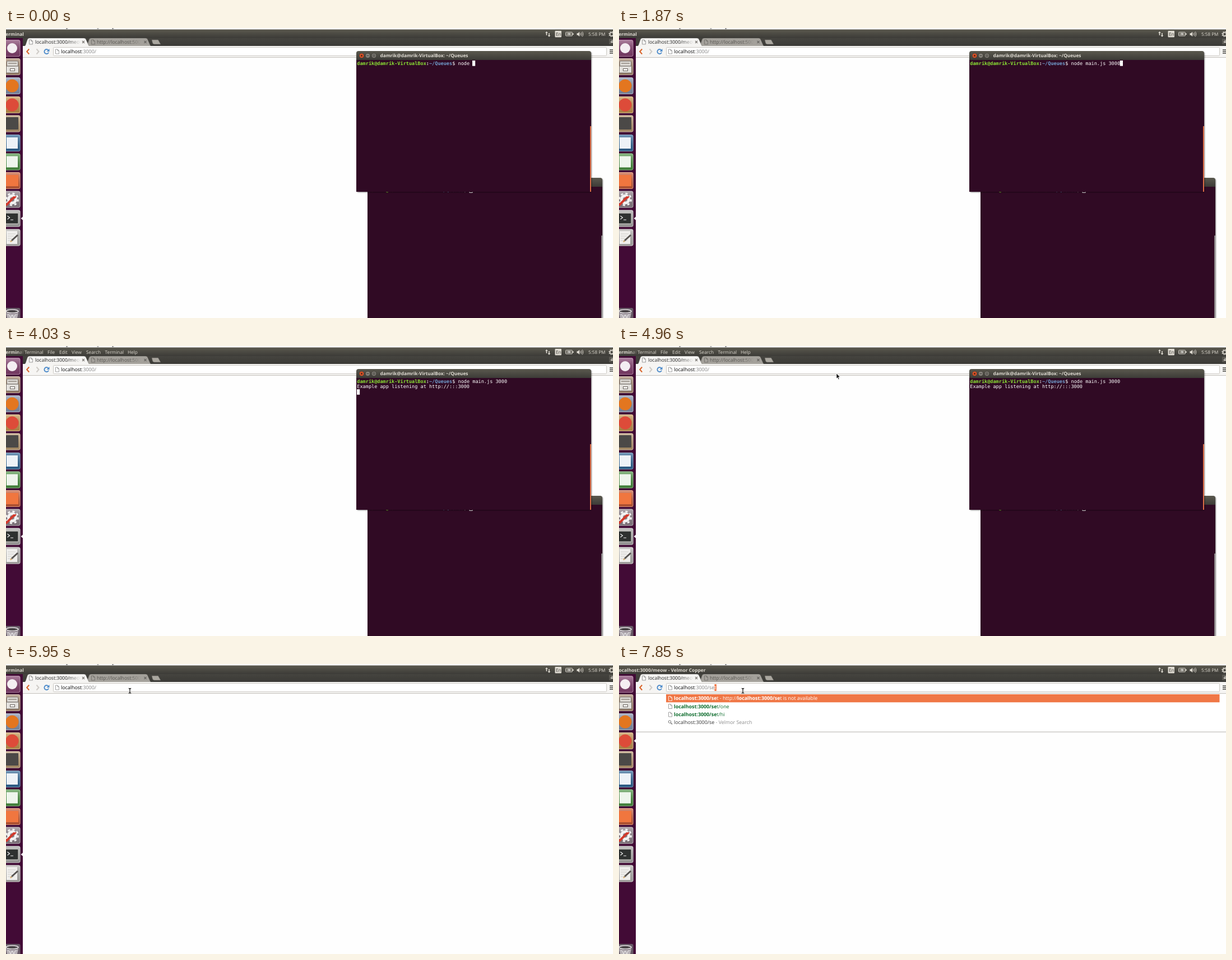
Animation of 1083 by 517 pixels, one loop 7990 ms. Source, as an HTML page:

```html
<!DOCTYPE html>
<html lang="en">
<head>
<meta charset="utf-8">
<title>Starting a server</title>
<style>
html, body { margin: 0; width: 100%; height: 100%; overflow: hidden; background: #fefefe; }
svg { display: block; width: 1083px; height: 517px; }
text { font-family: "Open Sans", "Noto Sans", sans-serif; font-size: 8.87px; white-space: pre; text-rendering: geometricPrecision; }
.mono { font-family: "DejaVu Sans Mono", monospace; font-size: 8.56px; fill: #fff; }
.panel { font-size: 8.3px; fill: #dfdbd2; }
.title { font-size: 8.4px; font-weight: 700; fill: #dfdbd2; }
.tab { font-size: 8.6px; }
.b { font-weight: 700; }
</style>
</head>
<body>
<svg id="stage" viewBox="0 0 1083 517" xmlns="http://www.w3.org/2000/svg"></svg>
<script>
const LOOP = 7990, COL = 5.15, ROW = 9.55;
const ORANGE = '#f07746', PURPLE = '#300a24';
const USER = 'damrik', HOST = USER + '@' + USER + '-VirtualBox';
const COMMAND = 'main.js 3000';

// Markup helpers
const rect = (x, y, w, h, fill, more = '') =>
  `<rect x="${x}" y="${y}" width="${w}" height="${h}" fill="${fill}" ${more}/>`;
const circle = (x, y, r, fill, more = '') =>
  `<circle cx="${x}" cy="${y}" r="${r}" fill="${fill}" ${more}/>`;
const path = (d, fill, more = '') => `<path d="${d}" fill="${fill}" ${more}/>`;
const line = (d, stroke, width = 1, more = '') =>
  `<path d="${d}" fill="none" stroke="${stroke}" stroke-width="${width}" ${more}/>`;
const text = (x, y, str, more = '') => `<text x="${x}" y="${y}" ${more}>${str}</text>`;
const bold = s => `<tspan class="b">${s}</tspan>`;
const page = (x, y, color = '#8a8a8a') =>
  line(`M${x + .5} ${y + .5}h3.5l2.5 2.5v5.5h-6zM${x + 4} ${y + .5}v2.5h2.5`, color, .8);
const cross = (x, y, r, color) =>
  line(`M${x - r} ${y - r}l${2 * r} ${2 * r}m0 ${-2 * r}l${-2 * r} ${2 * r}`, color, 1.1);
const tab = (x, fill) =>
  path(`M${x} 33q4 0 5-3l3-9q1-3 4-3h97q3 0 4 3l4 9q1 3 4 3z`, fill, 'stroke="#55534e" stroke-width=".4"');
const fade = (id, color, x1, x2) =>
  `<linearGradient id="${id}" gradientUnits="userSpaceOnUse" x1="${x1}" x2="${x2}" y1="0" y2="0">
    <stop stop-color="${color}"/><stop offset="1" stop-color="${color}" stop-opacity="0"/></linearGradient>`;
const shade = (id, top, bottom) =>
  `<linearGradient id="${id}" x2="0" y2="1"><stop stop-color="${top}"/><stop offset="1" stop-color="${bottom}"/></linearGradient>`;

const defs = `<defs>
  ${shade('bar', '#5b594f', '#3c3b37')}${shade('strip', '#45443f', '#3a3935')}
  ${shade('gloss', '#ffffff55', '#00000022')}
  ${fade('tabA', '#222', 112, 133)}${fade('tabB', '#55534f', 222, 241)}${fade('app', '#dfdbd2', 20, 32)}
  <clipPath id="selClip"><rect id="selBox" x="98" y="36" width="64" height="12"/></clipPath>
  <filter id="blur" x="-5%" y="-5%" width="110%" height="110%"><feGaussianBlur stdDeviation="1"/></filter>
</defs>`;

function panel() {
  return rect(0, 0, 1083, 3, '#fff') + line('M107 1h3M163 1h2M189 1h3', '#444') +
    rect(0, 2.5, 1083, 15.5, 'url(#bar)') +
    text(-5, 14, 'Terminal', 'class="title" id="app"') +
    `<g id="menu">${[['Terminal', 33], ['File', 74], ['Edit', 95], ['View', 117],
      ['Search', 143], ['Terminal', 176.5], ['Help', 217]]
      .map(([s, x]) => text(x, 14, s, 'class="panel"')).join('')}</g>` +
    path('M964.5 6l2.3 3h-1.5v4h-1.6v-4h-1.5zM969 16l-2.3-3h1.5v-4h1.6v4h1.5z', '#dfdbd2') +
    rect(979.5, 5, 11.5, 11.5, '#dfdbd2', 'rx="1"') + text(981, 14, 'En', 'class="panel" style="fill:#3c3b37"') +
    rect(998.5, 7.5, 12, 6.5, 'none', 'stroke="#dfdbd2" rx="1"') + rect(1011, 9.5, 1.6, 2.5, '#dfdbd2') +
    rect(1000, 9, 9, 3.5, '#98958c') + path('M1005 8l-2 3h1.6l-.6 2.5 2.5-3.4h-1.7z', '#fff') +
    path('M1018.5 9.3h2l2.7-2.6v8.6l-2.7-2.6h-2z', '#dfdbd2') +
    line('M1024.6 9q1.3 2 0 4M1026.4 7.7q2.4 3.3 0 6.6M1028.2 6.5q3.2 4.5 0 9', '#dfdbd2', .9) +
    text(1039, 14.1, '5:58 PM', 'class="panel" style="font-size:8.1px"') +
    circle(1080.5, 11, 3, 'none', 'stroke="#dfdbd2" stroke-width="1.6"') +
    circle(1080.5, 11, 4.6, 'none', 'stroke="#dfdbd2" stroke-width="1.4" stroke-dasharray="1.8 1.8"');
}

function launcher() {
  const tile = (y, fill) => rect(-8, y - 15, 33.5, 30, fill, 'rx="3"') +
    rect(-7.5, y - 14.5, 32.5, 29, 'url(#gloss)', 'rx="3" stroke="#fff" stroke-opacity=".35"');
  return rect(0, 18, 30, 499, '#420b36') +
    tile(36, '#84406f') + circle(11, 36, 9, '#f4eef2') +
    tile(69, '#a98a70') + rect(1.5, 59, 20, 9, '#dedbd6', 'rx="1" stroke="#77706a"') +
      rect(.5, 68, 22, 12, '#e4e2de', 'rx="1" stroke="#77706a"') +
      rect(7.5, 72.5, 8, 4, '#f4f3f1', 'stroke="#6a645f"') + line('M4 63h15', '#a39d96', 2) +
    tile(103, '#8695b0') + circle(11, 103, 11.5, '#e3761f') +
    tile(137, '#c59650') + circle(11, 137, 11.5, '#dd4b39') +
    tile(170.5, '#b99a70') + rect(0, 159, 22, 22, '#4b4947', 'rx="1"') +
    tile(205, '#2f6797') + rect(1, 195, 20, 20, '#edf2f7') +
    tile(238.5, '#48913f') + rect(1, 228.5, 20, 20, '#eef5ec') +
    tile(272, '#c85c36') + rect(0, 262, 22, 20, '#f0763f') +
    tile(305.5, '#8d8189') + circle(11, 305.5, 6.5, 'none', 'stroke="#f2f2f2" stroke-width="5"') +
      circle(11, 305.5, 10.5, 'none', 'stroke="#f2f2f2" stroke-width="3" stroke-dasharray="4.1 4.15"') +
      line('M1 315L14 302', '#d23a2c', 4, 'stroke-linecap="round"') +
      line('M13 302l4-1M15 304l3-4', '#d23a2c', 2) +
    tile(339.5, '#a8a8a6') + rect(-2, 330, 24, 19, '#2e3130', 'rx="1" stroke="#deded9"') +
      line('M2.5 335l4 3-4 3M8 342h5', '#f4f4f4', 1.2) +
    tile(373.5, '#b4b3b0') + rect(1, 362, 19, 23, '#f0efed') +
      line('M3 367h14M3 371h11M3 375h8M3 379h12', '#c8c6c2', .8) +
      line('M10 379L21 369', '#55524f', 3) + path('M7 382l1.5-4 3 3z', '#d2ad76') +
    rect(-8, 499, 33.5, 30, '#675a66', 'rx="3"') +
      `<ellipse cx="11" cy="505" rx="11" ry="3" fill="#4a4548" stroke="#e5e2e4" stroke-width="1.6"/>` +
      path('M0 508l2 9h18l2-9q-11 4-22 0z', '#b7b1b6') +
      line('M4 510l5 7M10 511l5 6M18 510l-5 7M12 511l-5 6', '#eeecee', .9) +
    path('M30 -3v6l-3.5-3z', '#fff', 'id="arrow"');
}

function browser() {
  return rect(30, 18, 1053, 15, 'url(#strip)') +
    tab(140, '#a4a19b') +
    path('M260 21h11.5l4.5 8h-11.5q-2 0-3-2z', '#aaa79f', 'stroke="#5b5954" stroke-width=".6"') +
    tab(30, '#f5f4f2') +
    page(41, 20.5) + page(152, 20.5, '#6c6a66') +
    text(52, 28, 'localhost:3000/meow', 'class="tab" fill="url(#tabA)"') +
    text(162, 28, 'http://localhost:5000', 'class="tab" fill="url(#tabB)"') +
    cross(138, 25, 2, '#77746f') + cross(248.5, 25, 2, '#65635f') +
    rect(1076, 19, 8, 10, '#5a5852', 'rx="1"') + path('M1079 26h4v-2h-4zM1080 23l1.5-2 1.5 2z', '#d8d5ce') +
    rect(30, 32, 1053, 20, '#f6f5f3') + rect(30, 52, 1053, 1, '#c4c1bc') +
    line('M41.2 37.5l-4 4.5 4 4.5', '#d9642a', 2) + line('M54.5 37.5l4 4.5-4 4.5', '#cfccc8', 2) +
    line('M75.3 39.3a4 4 0 1 0 .8 4.2', '#4f8ccb', 1.9) + path('M77.5 37v5h-5z', '#4f8ccb') +
    rect(84.5, 34.5, 987, 15, '#fff', 'stroke="#cbc8c3" rx="1"') + page(88, 37.5) +
    line('M1077 39h6M1077 42h6M1077 45h6', '#4a4844', 1.5) +
    text(98, 45, '', 'id="url"') +
    `<g id="selected" clip-path="url(#selClip)">${rect(98, 36, 64, 12, ORANGE, 'id="selFill"')}
      ${text(98, 45, '', 'id="selText" fill="#fff"')}</g>` +
    rect(160, 36, 1, 12, '#333', 'id="caret"');
}

function suggestions() {
  return `<g id="list">${rect(30, 53, 1053, 68, '#fff')}${rect(30, 120.5, 1053, 1, '#b5b2ae')}
    ${rect(30, 121.5, 1053, 1, '#e6e5e3')}${rect(84, 54, 987.5, 14.3, ORANGE)}
    ${page(88, 57, '#fff')}${page(88, 71)}${page(88, 85.5)}
    ${circle(90.5, 103, 2.3, 'none', 'stroke="#777"')}${line('M92.2 104.8l2.8 2.8', '#777', 1.4)}
    ${text(98, 64.4, '', 'id="hit0" fill="#fff"')}${text(98, 78.8, '', 'id="hit1" fill="#0b6b2b"')}
    ${text(98, 93.1, '', 'id="hit2" fill="#0b6b2b"')}${text(98, 107.4, '', 'id="hit3" fill="#333"')}</g>`;
}

const prompt = `<tspan class="b" fill="#8ae234">${HOST}</tspan><tspan class="b">:</tspan>` +
  `<tspan class="b" fill="#729fcf">~/Queues</tspan>$ `;

function terminal(x, y, content, thumb) {
  const button = (cx, fill) => circle(cx, 8.3, 4.1, fill, 'stroke="#35322d" stroke-width=".6"');
  return `<g transform="translate(${x} ${y})">
    ${rect(1, 2, 419, 250, '#000', 'rx="3" opacity=".45" filter="url(#blur)"')}
    ${rect(0, 15, 419, 236, PURPLE)}
    ${path('M0 16V4q0-4 4-4h411q4 0 4 4v12z', 'url(#bar)')}
    ${button(9.5, '#e2562a')}${cross(9.5, 8.3, 1.5, '#4a2012')}
    ${button(20.5, '#86837b')}${line('M18.5 8.3h4', '#3c3b37')}
    ${button(31.5, '#86837b')}${rect(30, 6.8, 3, 3, 'none', 'stroke="#3c3b37" stroke-width=".9"')}
    ${text(42.5, 11.3, HOST + ': ~/Queues', 'class="title" style="font-size:8.28px"')}
    ${text(1.3, 24.7, prompt, 'class="mono"')}${content}
    ${rect(417, thumb.y, 2, 251 - thumb.y, thumb.fill)}</g>`;
}

const stage = document.getElementById('stage');
stage.innerHTML = defs + rect(0, 0, 1083, 517, '#fefefe') + browser() + suggestions() +
  launcher() + panel() + `<g id="windows">` +
  terminal(645, 267, rect(35 * COL + 1.8, 17.5, 5, 9, 'none', 'stroke="#fff" stroke-width=".9"'),
    { y: 103, fill: '#8f8a8c' }) +
  terminal(625, 41, text(35 * COL + 1.3, 24.7, 'node <tspan id="typed"></tspan>', 'class="mono"') +
    text(1.3, 24.7 + ROW, 'Example app listening at http://:::3000', 'class="mono" id="output"') +
    rect(0, 0, 5.2, 9.7, '#fff', 'id="block"'), { y: 134, fill: '#dd6d47' }) +
  `</g>` +
  path('M0 0v9l2-1.8 1.5 3.6 1.5-.7-1.5-3.5h2.9z', '#111', 'id="pointer" stroke="#fff" stroke-width=".6"') +
  line('M218.8 43.5q2.2 0 2.2 1.5q0-1.5 2.2-1.5M218.8 52q2.2 0 2.2-1.5q0 1.5 2.2 1.5M221 45v6',
    '#222', 1.3, 'id="beam"');

const el = {};
stage.querySelectorAll('[id]').forEach(n => el[n.id] = n);

// Step tables: [start time, value...]
const TYPED = [[0, 0], [120, 1], [250, 3], [550, 4], [920, 5], [1210, 7], [1350, 8],
  [1500, 9], [1620, 10], [1750, 11], [1870, 12]];
const BLOCK_ROW = [[0, 0], [2540, -1], [2810, 0], [2930, 1], [3190, 2], [3470, -1],
  [4030, 2], [4600, -1], [5270, 2], [5820, -1]];
const MENU = [[0, 0], [4030, 1], [4450, 0], [4960, 1], [5390, 0]];
const POINTER = [[0, -99, 0], [4300, 872, 11], [4450, 666, 91], [4600, 600, 84], [4720, 528, 73],
  [4840, 455, 60], [4960, 388, 49], [5120, 238, 11], [5270, -99, 0]];
const CARET = [[0, 0], [6800, 1], [7180, 0], [7570, 1], [7700, 0]];
const QUERY = [[0, ''], [7700, 's'], [7850, 'se']];

const at = (table, t) => table.findLast(step => step[0] <= t).slice(1);
const show = (node, on) => node.style.display = on ? '' : 'none';
const setHtml = (node, html) => { if (node.markup !== html) node.innerHTML = node.markup = html; };
const attrs = (node, o) => { for (const k in o) node.setAttribute(k, o[k]); };

function drawTerminal(t) {
  const [count] = at(TYPED, t), [row] = at(BLOCK_ROW, t);
  setHtml(el.typed, COMMAND.slice(0, count));
  show(el.output, t >= 3190);
  show(el.block, row >= 0);
  attrs(el.block, { x: 1 + (row === 0 ? (40 + count) * COL : 0), y: 17 + row * ROW });
  show(el.windows, t < 5950);
}

function drawPanel(t) {
  const [menu] = at(MENU, t), focused = t >= 6100;
  show(el.menu, menu);
  el.app.style.fill = menu ? 'url(#app)' : '#dfdbd2';
  setHtml(el.app, focused ? 'localhost:3000/meow - Velmor Copper' : 'Terminal');
  attrs(el.app, { x: focused ? -3 : -5 });
  attrs(el.arrow, { transform: `translate(0 ${focused ? 137 : 339.5})` });
}

function drawAddress(t) {
  const [query] = at(QUERY, t), rest = query && 'set'.slice(query.length);
  const base = 'localhost:3000/' + query;
  setHtml(el.url, `localhost<tspan fill="#808080">:3000/${query}</tspan>`);
  const end = 98 + el.url.getComputedTextLength();
  const all = t >= 6100 && t < 6800;
  show(el.selected, all || query);
  if (all || query) {
    setHtml(el.selText, all ? base : rest);
    const x = all ? 98 : end, top = all && t >= 6660 ? 38 : 36;
    const width = el.selText.getComputedTextLength() + .6;
    attrs(el.selText, { x });
    attrs(el.selFill, { x, width });
    attrs(el.selBox, { x, width, y: top, height: 48 - top });
  }
  show(el.caret, at(CARET, t)[0]);
  attrs(el.caret, { x: Math.round(end) - 1 });
  show(el.list, query);
  if (!query) return;
  setHtml(el.hit0, `${bold(base)}${rest} - http://${bold(base)}${rest} is not available`);
  setHtml(el.hit1, `${bold(base)}${rest}/one`);
  setHtml(el.hit2, `${bold(base)}${rest}/hi`);
  setHtml(el.hit3, `${base}<tspan fill="#8c8c8c"> - Velmor Search</tspan>`);
}

function frame() {
  const t = performance.now() % LOOP, [px, py] = at(POINTER, t);
  drawTerminal(t);
  drawPanel(t);
  drawAddress(t);
  attrs(el.pointer, { transform: `translate(${px} ${py})` });
  show(el.beam, t >= 5270);
  requestAnimationFrame(frame);
}
frame();
</script>
</body>
</html>
```
